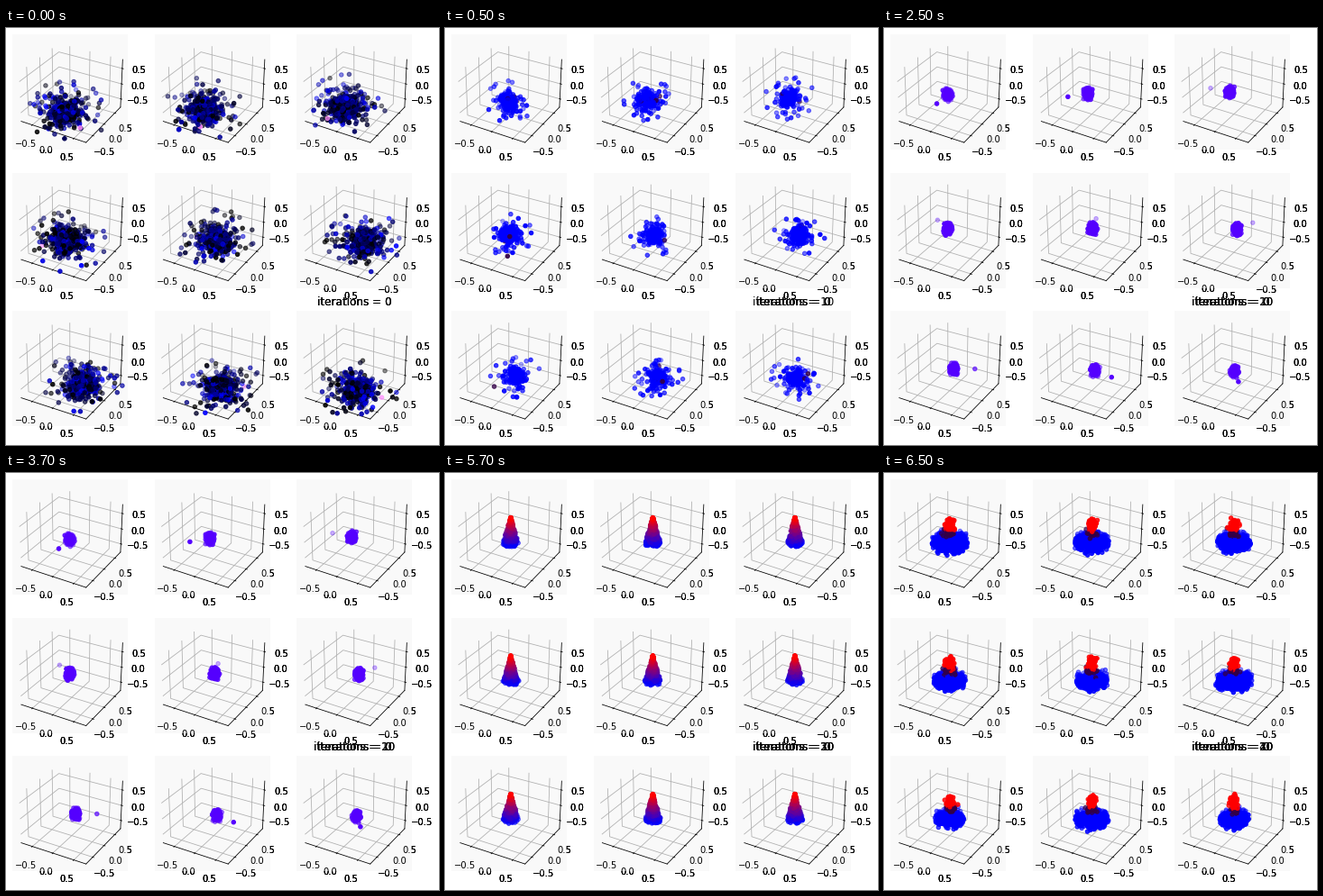
Write a matplotlib script that moves like this. It is 480 by 463 pixels and loops after 8 s.

```python
import numpy as np
import matplotlib.pyplot as plt
from matplotlib.animation import FuncAnimation

WIDTH, HEIGHT, DPI = 480, 463, 72
STEP_MS, STEPS = 500, 16
STATE_STARTS = [0, 1, 5, 9, 13]      # in steps of STEP_MS
SIZE, LEFT, TOP = 127.95, 7.2, 7.2   # panel geometry in pixels
PITCH_X, PITCH_Y = 157.5, 153.5
LIMIT = 0.75 * 25 / 24
BACKDROP = (0.976, 0.976, 0.976, 1)
PINK, VIOLET, BLUE, RED = (1, 0.55, 1), (0.33, 0, 1), (0, 0, 1), (1, 0, 0)
DARK = (0.2, 0, 0.28)

fig = plt.figure(figsize=((WIDTH + 1e-6) / DPI, (HEIGHT + 1e-6) / DPI),
                 dpi=DPI, facecolor="white")


def make_panel(i):
    row, col = divmod(i, 3)
    x = LEFT + col * PITCH_X
    y = HEIGHT - TOP - row * PITCH_Y - SIZE
    ax = fig.add_axes([x / WIDTH, y / HEIGHT, SIZE / WIDTH, SIZE / HEIGHT],
                      projection="3d", facecolor=BACKDROP)
    ax.set(xlim=(-LIMIT, LIMIT), ylim=(-LIMIT, LIMIT), zlim=(-LIMIT, LIMIT))
    for axis in (ax.xaxis, ax.yaxis, ax.zaxis):
        axis.set_ticks([-0.5, 0, 0.5])
        axis.set_pane_color(BACKDROP)
    return ax


def on_circle(i, radius, z, phase=0):
    """Each panel is turned 40 degrees further than the one before."""
    a = np.radians(-90 - 40 * i + phase)
    return np.array([radius * np.cos(a), radius * np.sin(a), z])


def paint(color, n):
    return np.tile(color, (n, 1)).astype(float)


def heavy_cloud(rng, n, df, scale, reach):
    """Gaussian core with long tails, cut off at a radius."""
    p = rng.normal(size=(n, 3)) * scale
    p /= np.sqrt(rng.chisquare(df, (n, 1)) / df)
    norm = np.linalg.norm(p, axis=1, keepdims=True)
    return p * np.minimum(1, reach / norm)


def scattered(rng, i):
    n = 520
    pts = heavy_cloud(rng, n, 3.2, (0.15, 0.15, 0.16), 0.85)
    pts += on_circle(i, 0.23, -0.58)
    pts[:, 2] = np.where(pts[:, 2] < -0.95, -1.6 - pts[:, 2], pts[:, 2])
    colors = paint((0, 0, 0), n)
    colors[:, 2] = np.clip(rng.normal(0.36, 0.34, n), 0, 1)
    pts = np.vstack([pts, on_circle(i, 0.66, -0.69, 45)])
    return pts, np.vstack([colors, PINK])


def gathering(rng, i):
    n = 260
    pts = heavy_cloud(rng, n, 2.3, (0.075, 0.075, 0.1), 0.55)
    pts += on_circle(i, 0.12, -0.28)
    colors = paint(BLUE, n)
    colors[:4] = DARK
    return pts, colors


def compact(rng, i):
    n = 200
    pts = np.clip(rng.normal(size=(n, 3)), -1.9, 1.9) * (0.042, 0.042, 0.08)
    pts += on_circle(i, 0.085, -0.07)
    pts = np.vstack([pts, on_circle(i, 0.53, -0.06)])
    return pts, paint(VIOLET, n + 1)


def disc(rng, n, radius):
    a = rng.uniform(0, 2 * np.pi, n)
    r = radius * np.sqrt(rng.uniform(0, 1, n))
    return r * np.cos(a), r * np.sin(a)


def cone(rng, i):
    n = 450
    t = rng.uniform(0, 1, n) ** 1.5
    t[0] = 1
    x, y = disc(rng, n, 0.175 * (1 - t))
    z = -0.25 + 0.82 * t
    return np.column_stack([x, y, z]), np.column_stack([t, 0 * t, 1 - t])


def split(rng, i):
    n_body, n_neck, n_head = 420, 25, 75
    half_width = [22, 21, 20.5, 20, 19.5, 22.5, 18.5, 21, 18.5][i]
    x, y = disc(rng, n_body, (half_width - 2) / 52.7)
    body = np.column_stack([x, y, rng.normal(-0.21, 0.07, n_body)])
    neck = rng.normal((0, 0, 0.09), (0.06, 0.06, 0.05), (n_neck, 3))
    head = rng.normal((0, 0, 0.34), (0.04, 0.04, 0.085), (n_head, 3))
    head[:, 2] = np.clip(head[:, 2], 0.17, 0.52)
    colors = [paint(BLUE, n_body), paint(DARK, n_neck), paint(RED, n_head)]
    return np.vstack([body, neck, head]), np.vstack(colors)


STATES = [scattered, gathering, compact, cone, split]


def make_title(iterations):
    x = LEFT + 2 * PITCH_X + SIZE / 2
    y = HEIGHT - (TOP + 2 * PITCH_Y - 6)
    return fig.text(x / WIDTH, y / HEIGHT, f"iterations = {iterations}",
                    fontsize=12, ha="center", va="baseline")


# Stacked axes thicken every label that lies outside the opaque square.
for _ in range(2):
    for i in range(9):
        make_panel(i)
panels = [make_panel(i) for i in range(9)]

for _ in range(2):
    make_title(0)
titles = [make_title(10 * k) for k in range(len(STATES))]
shown = {"state": None, "clouds": []}


def show_state(k):
    for cloud in shown["clouds"]:
        cloud.remove()
    shown["clouds"] = []
    for i, ax in enumerate(panels):
        pts, colors = STATES[k](np.random.default_rng(100 * k + i), i)
        shown["clouds"].append(ax.scatter(*pts.T, c=colors, s=20))
    for j, title in enumerate(titles):
        title.set_visible(j <= k)
    shown["state"] = k


def update(step):
    k = sum(step >= start for start in STATE_STARTS) - 1
    if k != shown["state"]:
        show_state(k)
    return shown["clouds"]


anim = FuncAnimation(fig, update, frames=STEPS, interval=STEP_MS,
                     init_func=lambda: update(0), repeat=True, repeat_delay=0)
plt.show()
```
